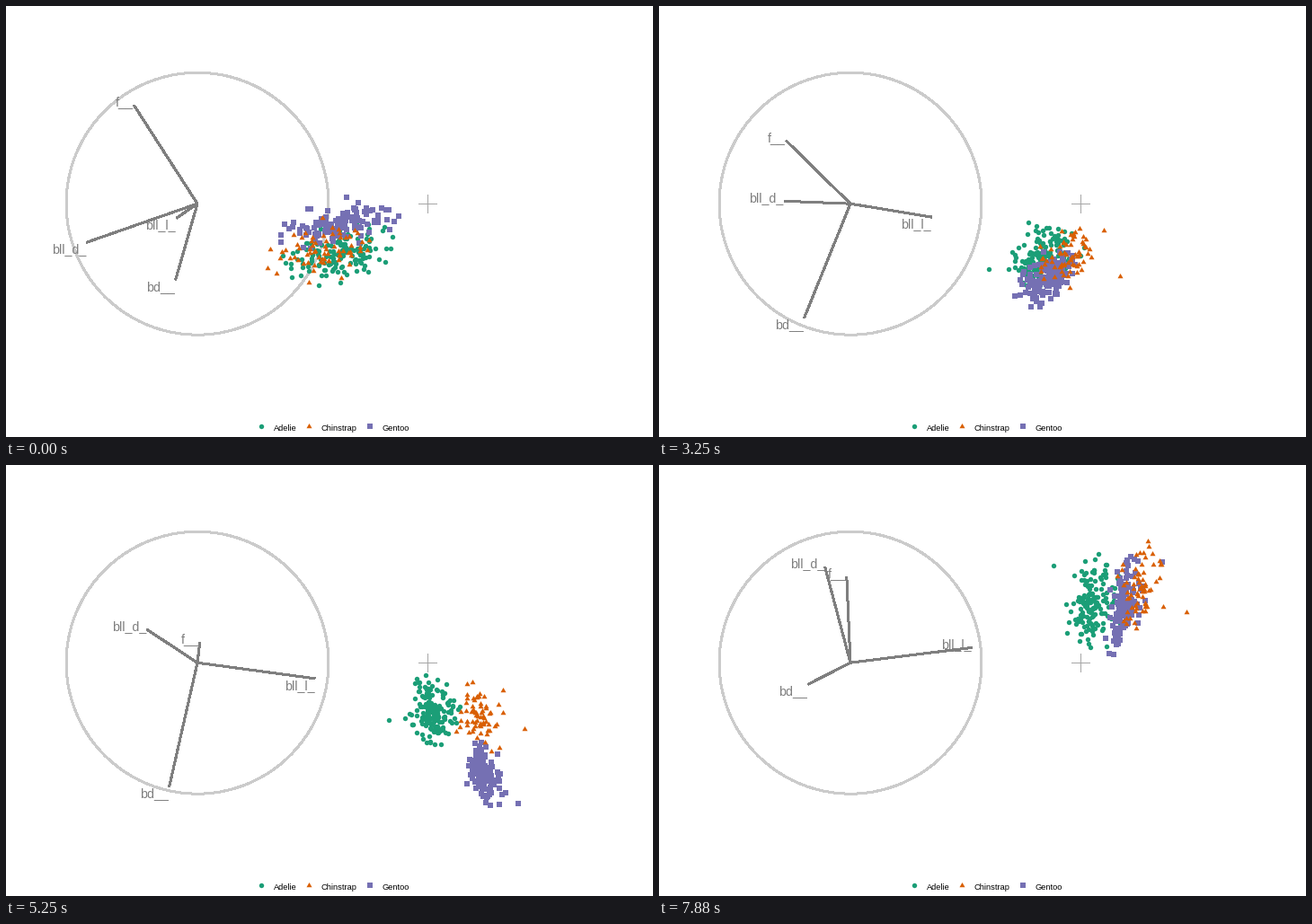
A matplotlib script that plays this animation: 720 by 480 pixels, repeating every 8 s.

```python
import numpy as np
import matplotlib.pyplot as plt
from matplotlib.animation import FuncAnimation

W, H, DPI = 720, 480, 100
PX = 72 / DPI                       # one pixel in points
FRAMES, INTERVAL, HOLD = 64, 125, 8
HUB, ORIGIN, RADIUS = (213.0, 220.2), (469.0, 220.0), 146.0
GREY, PALE = "#7f7f7f", "#cbcbcb"
VARIABLES = ["bll_l_", "bll_d_", "f__", "bd__"]

plt.rcParams["font.family"] = "Liberation Sans"

# colour, marker, size, count, correlation, mean bird, most unusual bird
SPECIES = {
    "Adelie": ("#1b9e77", "o", 5.4, 151, .40,
               (.39, .535, .155, .51), (.22, .89, .28, .72)),
    "Gentoo": ("#7570b3", "s", 5.4, 123, .68,
               (.725, .10, .65, .925), (1.2, .36, .87, 1.22)),
    "Chinstrap": ("#d95f02", (3, 0, 0), 7.0, 68, .55,
                  (.79, .545, .26, .52), (1.15, .465, -.01, .51)),
}
SPREAD = np.array([.115, .14, .12, .135])


def cloud(name, rng):
    """Normal cloud in four variables sharing one body-size factor."""
    count, corr, mean, odd = SPECIES[name][3:]
    own = rng.standard_normal((count - 1, 4))
    size = rng.standard_normal((count - 1, 1))
    z = np.sqrt(corr) * size + np.sqrt(1 - corr) * own
    z = np.clip((z - z.mean(0)) / z.std(0), -2.1, 2.1)
    return np.vstack([np.array(mean) + z * SPREAD, odd])


def orthonormal(m):
    u, _, vt = np.linalg.svd(m, full_matrices=False)
    return u @ vt


def geodesic(a, b, t):
    """Plane at fraction t on the shortest turn from a to b."""
    u, c, vt = np.linalg.svd(a.T @ b)
    c = np.clip(c, -1, 1)
    p = a @ u
    d = b @ vt.T - p * c
    d /= np.linalg.norm(d, axis=0) + 1e-12
    angle = t * np.arccos(c)
    spin = orthonormal((1 - t) * u.T + t * vt)
    return (p * np.cos(angle) + d * np.sin(angle)) @ spin


def plane(*tips):
    return orthonormal(np.array(tips) / RADIUS)


# planes passed on the tour: step -> axis tips in pixels, y up
KNOTS = {
    0: plane((-23, -16), (-122, -43), (-70, 110), (-24, -85)),
    11: plane((66, 9), (-56, -4), (-94, 91), (-68, -113)),
    18: plane((90, -15), (-73, 3), (-71, 70), (-51, -127)),
    28: plane((94, -45), (-106, 0), (-11, 27), (-32, -136)),
    40: plane((146, -6), (-1, 78), (13, 15), (-6, -121)),
    47: plane((144, -4), (-13, 97), (-2, 67), (-24, -85)),
    55: plane((135, 17), (-28, 106), (-4, 95), (-47, -24)),
}
# turning points lie on the extended paths
for turn, start, end in ((13, 0, 11), (26, 28, 40), (41, 28, 40)):
    KNOTS[turn] = geodesic(KNOTS[start], KNOTS[end],
                           (turn - start) / (end - start))
STEPS = sorted(KNOTS)


def basis(step):
    i = min(np.searchsorted(STEPS, step, side="right"), len(STEPS) - 1)
    a, b = STEPS[i - 1], STEPS[i]
    return geodesic(KNOTS[a], KNOTS[b], (step - a) / (b - a))


fig = plt.figure(figsize=(W / DPI, H / DPI), dpi=DPI, facecolor="white")
ax = fig.add_axes([0, 0, 1, 1])
ax.set_xlim(0, W)
ax.set_ylim(H, 0)
ax.axis("off")


def line(x, y, color, width):
    return ax.plot(x, y, color=color, lw=width * PX, antialiased=False,
                   solid_capstyle="butt")[0]


def dots(x, y, name):
    color, marker, size = SPECIES[name][:3]
    return ax.plot(x, y, ls="none", marker=marker, ms=size * PX, color=color,
                   mew=0, zorder=4, antialiased=False)[0]


arc = np.linspace(0, 2 * np.pi, 100)
line(HUB[0] + RADIUS * np.cos(arc), HUB[1] - RADIUS * np.sin(arc), PALE, 2)
cx, cy = 469.4, 220.4
line((cx - 10, cx + 10), (cy, cy), "#a6a6a6", 1)
line((cx, cx), (cy - 10, cy + 10), "#a6a6a6", 1)

for name, x in (("Adelie", 284), ("Chinstrap", 337), ("Gentoo", 405)):
    dots([x + .2], [468.4], name)
    ax.text(x + 13.5, 472.7, name, size=9.3 * PX, color="black")

rng = np.random.default_rng(7)
birds = {name: cloud(name, rng) for name in SPECIES}
marks = {name: dots([], [], name) for name in SPECIES}
spokes = [line([], [], GREY, 2) for _ in VARIABLES]
labels = [ax.text(0, 0, v, size=14.3 * PX, color=GREY, ha="right",
                  va="baseline") for v in VARIABLES]


def draw(frame):
    view = basis(max(0, frame - HOLD)) * RADIUS
    for (dx, dy), spoke, label in zip(view, spokes, labels):
        x, y = HUB[0] + dx, HUB[1] - dy
        spoke.set_data((HUB[0], x), (HUB[1], y))
        label.set_position((x - .8, y + (.5 if dy > .1 else 12)))
    for name, mark in marks.items():
        p = birds[name] @ view
        mark.set_data(ORIGIN[0] + p[:, 0], ORIGIN[1] - p[:, 1])
    return [*spokes, *labels, *marks.values()]


anim = FuncAnimation(fig, draw, frames=FRAMES, interval=INTERVAL,
                     repeat=True, repeat_delay=0, blit=False)
plt.show()
```
